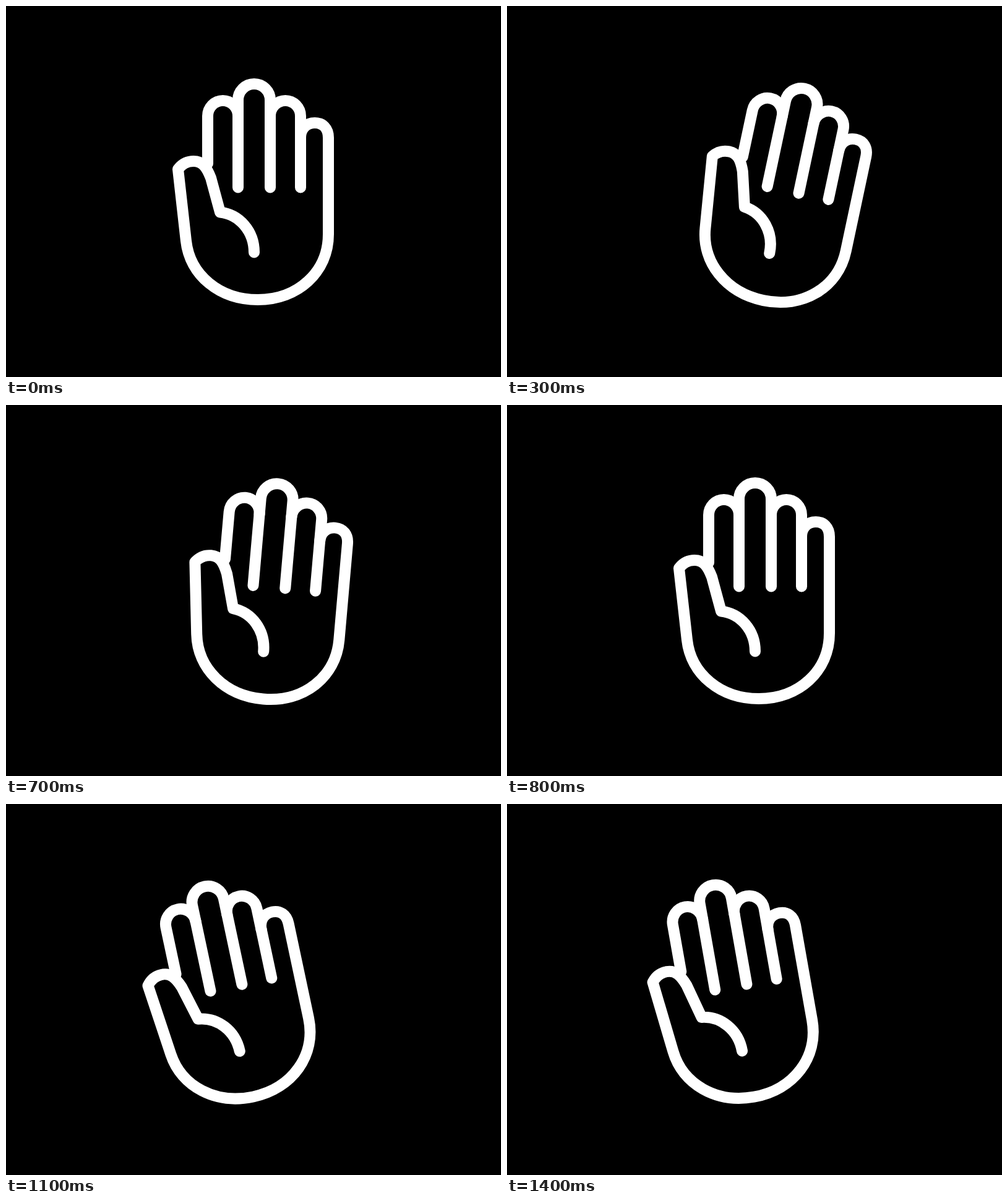
Write an HTML page that moves like this. It is 800 px wide and 600 px high and loops after 1.5 s.

```html
<!DOCTYPE html>
<html lang="en">
<head>
<meta charset="utf-8">
<title>Waving hand</title>
<style>
  html, body { margin: 0; height: 100%; overflow: hidden; background: #000; }
  svg { display: block; width: 100vw; height: 100vh; }
  path { fill: none; stroke: #fff; stroke-width: 18; stroke-linecap: round; stroke-linejoin: round; }
</style>
</head>
<body>
<svg viewBox="0 0 800 600">
  <g id="hand">
    <!-- index, middle and ring fingers -->
    <path d="M326 255V178A24.5 25 0 0 1 375 178"/>
    <path d="M375 293.5V152A26 26 0 0 1 427 152V293.5"/>
    <path d="M427 178A24.5 25 0 0 1 476 178V293.5"/>
    <!-- little finger, palm and thumb -->
    <path d="M476 213C476 198 486 189 499 189C512 189 521 198 521 213V369
             C521 430 472 475 407 475C345 475 297 435 291 380L278 264
             C284 256 293 251 303 251C317 251 324 260 331 278L346 333.5
             C377 337 401 364 401 398.5"/>
  </g>
</svg>
<script>
  const STEP = 100, STEPS = 15, HALF_WAVE = 8;
  const TILTS = [0, 5, 10, 12, 13]; // degrees, from upright to the far end of the swing
  const SHIFT = 9.4;
  const hand = document.getElementById('hand');

  function draw(now) {
    const step = Math.floor(now / STEP) % STEPS;
    const side = step < HALF_WAVE ? 1 : -1;
    const tilt = side * TILTS[4 - Math.abs(step % HALF_WAVE - 4)];
    const shift = Math.sign(tilt) * SHIFT;
    hand.setAttribute('transform', `translate(${shift} 0) rotate(${tilt} 400.5 465)`);
    requestAnimationFrame(draw);
  }

  draw(0);
</script>
</body>
</html>
```
